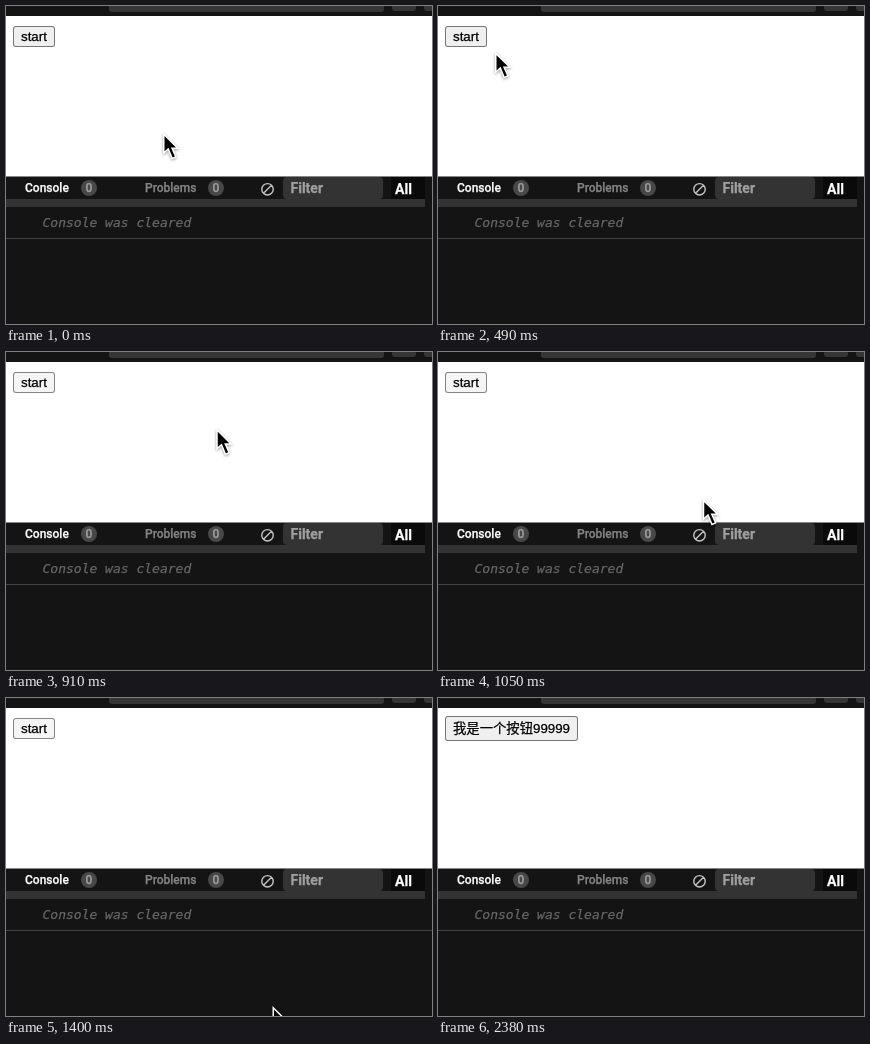
An HTML page with a canvas for the animation above (2590 ms loop, 426x318 px).

```html
<!DOCTYPE html>
<html lang="en">
<head>
<meta charset="utf-8">
<title>Console and button</title>
<style>
  html, body { margin: 0; width: 100%; height: 100%; overflow: hidden; background: #141414; }
  canvas { display: block; width: 426px; height: 318px; }
</style>
</head>
<body>
<canvas id="stage"></canvas>
<script>
const W = 426, H = 318, LOOP = 2590, STEP = 70;
const PRESS = 700, DONE = 1820;
const TAB_FONT = '500 12px Roboto, sans-serif';
const BAR_FONT = 'bold 14px Roboto, sans-serif';
const LOG_FONT = 'italic 13px "DejaVu Sans Mono", monospace';
const BUTTON_FONT = '13.333px "Liberation Sans", "Noto Sans CJK SC", "Noto Sans CJK", sans-serif';

const canvas = document.getElementById('stage');
const ctx = canvas.getContext('2d');
const ratio = window.devicePixelRatio || 1;
canvas.width = W * ratio;
canvas.height = H * ratio;
ctx.scale(ratio, ratio);

const linear = p => p;
const swing = p => (1 - Math.cos(Math.PI * p)) / 2;
const easeIn = n => p => p ** n;
const easeOut = n => p => 1 - (1 - p) ** n;

// Each leg moves the pointer from where the previous one left it.
const origin = { x: 157, y: 126.5 };
const legs = [
  { from: 0, to: 70, x: 145, y: 110.3, ease: Math.floor },
  { from: 210, to: 630, x: 27.7, y: 24, ease: swing },
  { from: PRESS, to: 1190, x: 278.3, y: 239, ease: easeOut(2.33), easeY: easeIn(1.67) },
  { from: 1190, to: 1400, x: 266.5, y: 308, ease: easeOut(4) },
  { from: 2170, to: 2380, x: 222, y: 322, ease: linear }
];

function pointerAt(t) {
  let { x, y } = origin;
  for (const leg of legs) {
    const p = Math.min(1, Math.max(0, (t - leg.from) / (leg.to - leg.from)));
    x += (leg.x - x) * leg.ease(p);
    y += (leg.y - y) * (leg.easeY || leg.ease)(p);
  }
  return [x, y];
}

function rect(x, y, w, h, color) {
  ctx.fillStyle = color;
  ctx.fillRect(x, y, w, h);
}

function round(x, y, w, h, r, color) {
  ctx.beginPath();
  ctx.roundRect(x, y, w, h, r);
  ctx.fillStyle = color;
  ctx.fill();
}

// The hairline stroke gives the slightly heavy text smoothing.
function text(str, x, y, font, color, align = 'left') {
  ctx.font = font;
  ctx.fillStyle = ctx.strokeStyle = color;
  ctx.textAlign = align;
  ctx.lineWidth = 0.25;
  ctx.fillText(str, x, y);
  ctx.strokeText(str, x, y);
}

function drawBrowser() {
  rect(0, 0, W, H, '#141414');
  round(103, -6, 275, 12, 3, '#363636');
  round(386, -6, 24, 11, 3, '#363636');
  round(418, -6, 20, 11, 3, '#363636');
  rect(0, 10, W, 160, '#fff');
}

function drawTab(label, x, color, badgeX) {
  text(label, x, 186, TAB_FONT, color);
  round(badgeX - 8, 174, 16, 16, 8, '#484848');
  text('0', badgeX, 186.2, TAB_FONT, '#a0a0a0', 'center');
}

function drawClearIcon(x, y) {
  ctx.beginPath();
  ctx.arc(x, y, 5.7, 0, Math.PI * 2);
  ctx.moveTo(x - 4, y + 4);
  ctx.lineTo(x + 4, y - 4);
  ctx.strokeStyle = '#c4c4c4';
  ctx.lineWidth = 1.4;
  ctx.stroke();
}

function drawConsole() {
  rect(0, 170, W, 1, '#838987');
  drawTab('Console', 19, '#fff', 83);
  drawTab('Problems', 139, '#858585', 210);
  drawClearIcon(261.5, 183.3);
  rect(385, 171, 34, 22, '#0a0a0a');
  rect(0, 193, 419, 8, '#333');
  round(277, 171, 100, 22, 4, '#333');
  text('Filter', 284.5, 187.3, BAR_FONT, '#a0a0a0');
  text('All', 389, 187.8, BAR_FONT, '#fff');
  text('Console was cleared', 36.5, 221, LOG_FONT, '#666');
  rect(0, 232, W, 1, '#444');
}

function drawButton(t) {
  const done = t >= DONE;
  const pressed = t >= PRESS && !done;
  const [y, w, h] = done ? [18, 133, 25] : [20, 42, 21];
  round(7, y, w, h, 3, pressed ? '#858585' : '#767676');
  round(8, y + 1, w - 2, h - 2, 2, pressed ? '#f5f5f5' : '#efefef');
  text(done ? '我是一个按钮99999' : 'start', 15, 35, BUTTON_FONT, '#000');
}

function drawPointer(t) {
  const [x, y] = pointerAt(t);
  const arrow = new Path2D('M1.5 3.6V18.8L5.5 15.2L9.6 25L11.9 24L7.9 15H13Z');
  ctx.save();
  ctx.translate(x, y);
  ctx.shadowColor = 'rgba(0, 0, 0, 0.4)';
  ctx.shadowBlur = 3 * ratio;
  ctx.shadowOffsetY = ratio;
  ctx.strokeStyle = '#fff';
  ctx.lineWidth = 3;
  ctx.stroke(arrow);
  ctx.shadowColor = 'transparent';
  ctx.fillStyle = '#000';
  ctx.fill(arrow);
  ctx.restore();
}

function draw(t) {
  drawBrowser();
  drawConsole();
  drawButton(t);
  drawPointer(t);
}

const start = performance.now();
function tick() {
  const t = (performance.now() - start) % LOOP;
  draw(Math.floor(t / STEP) * STEP);
  requestAnimationFrame(tick);
}
tick();
</script>
</body>
</html>
```
